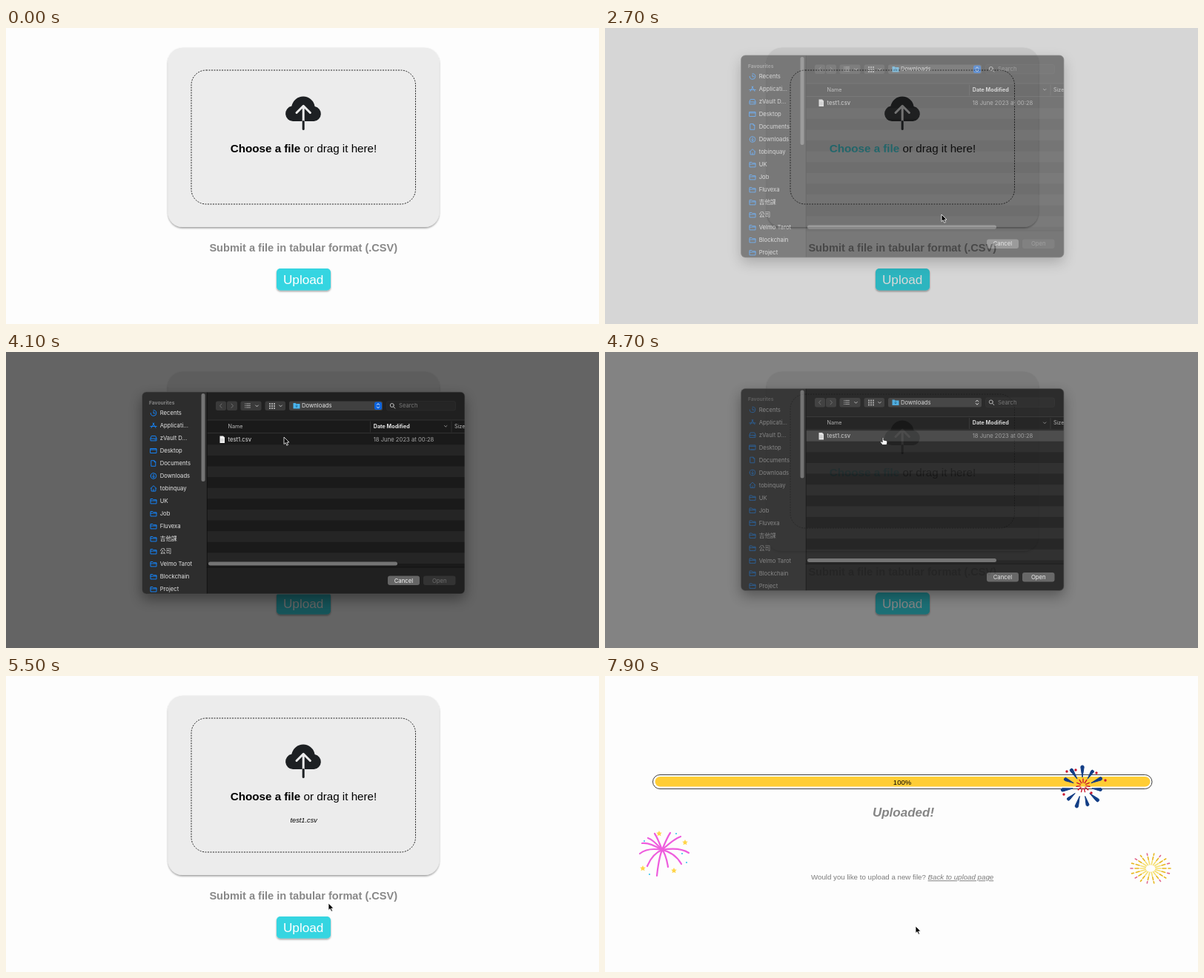
Animation of 800x400 px, one loop 8 s. Source, as an HTML page:

```html
<!DOCTYPE html>
<html lang="en">
<head>
<meta charset="utf-8">
<title>CSV upload</title>
<style>
  html, body { margin: 0; width: 100%; height: 100%; overflow: hidden; background: #fdfdfd; }
  svg { display: block; width: 800px; height: 400px; }
  text { white-space: pre; }
  .page { font-family: "Liberation Sans", Arial, sans-serif; }
  .sheet { font-family: Inter, "Noto Sans CJK TC", "Noto Sans CJK", sans-serif; font-size: 7.7px; fill: #e4e4e4; }
  .mid { text-anchor: middle; }
  .bold { font-weight: 700; }
  .line { fill: none; stroke-linecap: round; stroke-linejoin: round; }
</style>
</head>
<body>
<svg id="stage" viewBox="0 0 800 400"></svg>
<script>
const LOOP = 8000, STEP = 100;
const stage = document.getElementById('stage');
const clamp = v => Math.max(0, Math.min(1, v));
const between = (t, a, b) => t >= a && t < b;

const rect = (x, y, w, h, r, fill, more = '') =>
  `<rect x="${x}" y="${y}" width="${w}" height="${h}" rx="${r}" fill="${fill}" ${more}/>`;
const path = (d, stroke, width = 1, more = '') =>
  `<path class="line" d="${d}" stroke="${stroke}" stroke-width="${width}" ${more}/>`;
const dot = (x, y, r, fill) => `<circle cx="${x}" cy="${y}" r="${r}" fill="${fill}"/>`;
const text = (x, y, str, more = '') => `<text x="${x}" y="${y}" ${more}>${str}</text>`;
const polar = (cx, cy, r, a, squash = 1) =>
  [cx + r * Math.cos(a), cy + r * Math.sin(a) * squash].map(v => v.toFixed(1)).join(' ');

function uploadPage() {
  return `<g id="upload" class="page">
    ${rect(218.5, 26.5, 366, 242.5, 20, '#ececec', 'filter="url(#soft)"')}
    ${rect(250, 57, 302.5, 181, 20, 'none', 'stroke="#222" stroke-dasharray="2 1.5"')}
    <path fill="#1d2023" d="M387 126a10.3 10.3 0 0 1-1.6-20.4A15.8 15.8 0 0 1 416.6 106A10.1 10.1 0 0 1 415.5 126Z"/>
    ${path('M401.2 126V106M392 114.500L401.200 105.300L410.400 114.500', '#ececec', 3)}
    ${path('M401.2 126.500V136.500', '#1d2023', 3)}
    <text class="mid" x="401.500" y="168" font-size="15.2"><tspan id="choose" class="bold">Choose a file</tspan> or drag it here!</text>
    ${text(401.7, 198, 'test1.csv', 'id="chosen" class="mid" font-size="9.2" font-style="italic"')}
    ${text(401.3, 302, 'Submit a file in tabular format (.CSV)', 'class="mid bold" font-size="14.6" fill="#888"')}
    ${rect(365, 325, 73, 29.5, 5, '#34d5e1', 'id="button" filter="url(#soft)"')}
    ${text(401.2, 346, 'Upload', 'class="mid" font-size="17.2" fill="#fff"')}
  </g>`;
}

const folder = 'M-4 3V-3H-1L0-1.800H4V3ZM-4-.500H4';
const icons = [
  'M-3.800 0A3.800 3.800 0 1 0 0-3.800M0-2V.300H2',
  'M-3 3L.800-3.500M3 3L-.800-3.500M-4.200 1H4.200',
  'M-4 3V0L-2.800-3H2.800L4 0V3ZM-4 .500H4M2 1.700H2.500',
  'M-4-3H4V3H-4ZM-4-1.500H4M-2 3H2',
  'M-2.800-3.800H1L2.800-2V3.800H-2.800ZM1-3.800V-2H2.800',
  'M-3.800 0A3.800 3.800 0 1 0 3.800 0A3.800 3.800 0 1 0-3.800 0M0-2V2M-1.500 .600L0 2L1.500 .600',
  'M-4 0L0-3.800L4 0M-2.900-.500V3.500H2.900V-.500M0 3.500V1'
];
const places = ['Recents', 'Applicati...', 'zVault D...', 'Desktop', 'Documents', 'Downloads', 'tobinquay',
  'UK', 'Job', 'Fluvexa', '吉他課', '公司', 'Velmo Tarot', 'Blockchain', 'Project'];

function sidebar() {
  const items = places.map((name, i) => {
    const y = 82.5 + 17 * i;
    return `<g transform="translate(199 ${y})">${path(icons[i] || folder, '#1681f2', 1)}</g>` + text(207.7, y + 2.7, name);
  }).join('');
  return rect(184, 54.5, 87, 272, 0, '#2d2d2d') +
    `<g id="places">${text(193, 71, 'Favourites', 'class="bold" font-size="6.7" fill="#858585"')}${items}</g>` +
    rect(263.5, 56, 5, 119, 2.5, '#747474');
}

function toolbar() {
  const chevron = x => path(`M${x - 1.8} 72l1.800 1.800l1.800-1.800`, '#ccc', 0.9);
  const bullets = [70, 72.5, 75].map(y => path(`M322.500 ${y}h.500M324.500 ${y}h5`, '#bbb', 0.8)).join('');
  const tiles = [69, 72, 75].map(y => [355, 358, 361].map(x => rect(x, y, 2, 2, 0.3, '#aaa')).join('')).join('');
  return rect(283, 66.5, 14, 12.5, 2.5, '#3a3a3a') + rect(298, 66.5, 14, 12.5, 2.5, '#3a3a3a') +
    path('M291 70L288.500 72.800L291 75.500M304 70L306.500 72.800L304 75.500', '#777', 0.9) +
    rect(316.5, 66.5, 28, 12.5, 2.5, '#3a3a3a') + bullets + chevron(338.5) +
    rect(349.5, 66.5, 27.5, 12.5, 2.5, '#3a3a3a') + tiles + chevron(370.5) +
    rect(382, 66.5, 126, 12.5, 2.5, '#404040') +
    `<path d="M387.500 76.500V69h3l1 1h5v6.500Z" fill="#4bb5ee"/>` +
    path('M392 71.300v3m-1.300-1.200l1.300 1.200l1.300-1.200', '#176795', 0.8) +
    text(399, 75.4, 'Downloads') +
    rect(497, 67.5, 10, 10.5, 2.5, '#0b62dc', 'id="popup"') +
    path('M500.300 71.500l1.700-1.800l1.700 1.800M500.300 74l1.700 1.800l1.700-1.800', '#fff', 0.9) +
    rect(513.5, 66.5, 93, 12.5, 2.5, '#252525', 'stroke="#333" stroke-width=".5"') +
    path('M523.300 72a2.500 2.500 0 1 1-5 0a2.500 2.500 0 1 1 5 0M522.800 74l2 2.200', '#ccc', 0.9) +
    text(530, 75.4, 'Search', 'fill="#777"');
}

function fileList() {
  let rows = '';
  for (let i = 1; i < 12; i += 2) rows += rect(271, 110.7 + 14.6 * i, 348, 14.6, 0, '#252525');
  return rect(271, 92, 348, 199, 0, '#1a1a1a') + rows +
    rect(271, 110.7, 348, 14.6, 0, '#0a54c4', 'id="row"') +
    path('M271 92H619M271 109.500H619M491.500 94V108M601 94V108', '#3b3b3b', 0.7) +
    text(299.5, 103, 'Name', 'font-size="7.2" fill="#bbb"') +
    text(495.7, 103, 'Date Modified', 'class="bold" font-size="7.2"') +
    path('M591.500 99.500l1.700 1.700l1.700-1.700', '#aaa', 0.8) +
    text(605, 103, 'Size', 'font-size="7.2" fill="#bbb"') +
    `<path d="M288.500 113.500h4.500l2 2v7.500h-6.500Z" fill="#f1f1f1"/>` +
    path('M290 118h3.500M290 120h3.500', '#aaa', 0.6) +
    text(299.5, 120.8, 'test1.csv') +
    text(495.7, 120.8, '18 June 2023 at 00:28', 'fill="#a5a5a5"') +
    rect(273, 283.5, 255, 5, 2.5, '#747474');
}

function fileSheet() {
  return `<g id="sheet" class="sheet">
    ${rect(183.5, 54, 435.5, 273, 6, '#202020', 'filter="url(#deep)"')}
    <g clip-path="url(#sheetClip)">
      ${rect(271, 54, 348, 273, 0, '#202020')}${sidebar()}${toolbar()}${fileList()}
      ${path('M271.300 54V327M271 291H619', '#101010', 0.8)}
      ${rect(515, 302.5, 43, 12.5, 3, '#656565')}
      ${text(536.5, 311.5, 'Cancel', 'class="mid" font-weight="500"')}
      ${rect(563, 302.5, 43.5, 12.5, 3, '#333', 'id="open"')}
      ${text(584.7, 311.5, 'Open', 'id="openLabel" class="mid"')}
    </g>
    ${rect(183.5, 54, 435.5, 273, 6, 'none', 'stroke="#555" stroke-width=".7"')}
  </g>`;
}

function pinkBurst() {
  const tips = [[47, 240], [50, 226], [58, 219], [67, 213], [88, 212], [102, 217], [113, 239], [103, 254], [85, 258], [70, 270], [57, 257]];
  const rays = tips.map(([x, y]) =>
    path(`M77 235Q${(77 + x) / 2 + (x - 77) * 0.15} ${(235 + y) / 2 - 6} ${x} ${y}`, '#ee5ddd', 2.2)).join('');
  const star = ([x, y]) => {
    const points = Array.from({ length: 10 }, (_, i) => polar(x, y, i % 2 ? 2 : 4, -Math.PI / 2 + i * Math.PI / 5));
    return `<path d="M${points.join('L')}Z" fill="#ffd54a"/>`;
  };
  return rays + [[73, 213], [108, 225], [51, 260], [93, 263]].map(star).join('') +
    [[53, 223], [96, 213], [110, 252], [60, 268], [104, 240]].map(([x, y]) => dot(x, y, 1.1, '#38c6ed')).join('');
}

function blueBurst() {
  let out = '';
  for (let i = 0; i < 11; i++) {
    const a = -Math.PI / 2 + i * Math.PI * 2 / 11;
    const r = 27 - i % 2 * 2;
    out += `<path d="M${polar(644, 150, 13, a)}L${polar(644, 150, r, a - 0.08)}A2 2 0 0 1 ${polar(644, 150, r, a + 0.08)}Z" fill="#123d85" stroke="#123d85" stroke-linejoin="round"/>`;
    out += path(`M${polar(645, 148, 4, a)}L${polar(645, 148, 9, a)}`, '#c8162e', 1.4);
  }
  return out + [[623, 129], [635, 127], [675, 141], [619, 160], [656, 158], [663, 131]].map(([x, y]) => dot(x, y, 1.7, '#c8162e')).join('');
}

function goldBurst() {
  let out = '';
  for (let i = 0; i < 18; i++) {
    const a = i * Math.PI / 9;
    const ray = (r0, r1, color) => path(`M${polar(736, 260, r0, a, 0.75)}L${polar(736, 260, r1, a, 0.75)}`, color, 1.6);
    out += ray(7, 14, '#f6df70') + ray(16, 21, '#e8b71e') + ray(24, 27, i % 2 ? '#e2698c' : '#e8b71e');
  }
  return out;
}

const bursts = [[77, 240, pinkBurst], [645, 150, blueBurst], [736, 260, goldBurst]];

function resultPage() {
  return `<g id="result" class="page">
    ${rect(64.5, 133.5, 673.5, 19, 9.5, '#fff', 'stroke="#3d3d3d"')}
    ${rect(67.5, 136, 668, 13.5, 6.75, '#ffcd35', 'id="bar"')}
    ${text(401, 146.7, '', 'id="percent" class="mid" font-size="9.5"')}
    <g id="done">
      ${text(402.5, 190, 'Uploaded!', 'class="mid bold" font-size="17" font-style="italic" fill="#858585"')}
      <text x="278" y="275.300" font-size="9.73" fill="#7c7c7c">Would you like to upload a new file? <tspan font-style="italic" text-decoration="underline">Back to upload page</tspan></text>
      ${bursts.map(([, , draw]) => `<g class="burst">${draw()}</g>`).join('')}
    </g>
  </g>`;
}

stage.innerHTML = `<defs>
    <filter id="soft" x="-20%" y="-20%" width="140%" height="150%"><feDropShadow dx="0" dy="1.500" stdDeviation="1.300" flood-opacity=".4"/></filter>
    <filter id="deep" x="-20%" y="-20%" width="140%" height="150%"><feDropShadow dx="0" dy="7" stdDeviation="9" flood-opacity=".4"/></filter>
    <clipPath id="sheetClip">${rect(183.5, 54, 435.5, 273, 6, '#000')}</clipPath>
  </defs>
  ${rect(0, 0, 800, 400, 0, '#fdfdfd')}
  ${uploadPage()}${resultPage()}
  ${rect(0, 0, 800, 400, 0, '#000', 'id="dim"')}
  ${fileSheet()}
  <g id="cursor">
    <circle id="ring" r="18" fill="none" stroke="#222" stroke-width="1.800"/>
    <path id="arrow" d="M0 0V9.500L2.200 7.600L3.800 11.200L5.500 10.400L3.900 7H7Z" fill="#000" stroke="#fff" stroke-width=".800"/>
    <path id="hand" d="M-.900 .800Q0-.700 .900 .800V4L5 5Q6 5.300 5.800 7L5 10.500H-.800L-3.500 7Q-4 5.500-2.500 5.800L-.900 7Z" fill="#fff" stroke="#222" stroke-width=".800"/>
  </g>`;

const el = {};
stage.querySelectorAll('[id]').forEach(node => el[node.id] = node);
const burstNodes = stage.querySelectorAll('.burst');
const set = (name, attr, value) => el[name].setAttribute(attr, value);
const show = (name, on) => set(name, 'display', on ? 'inline' : 'none');

// time, x, y of the pointer tip
const route = [[700, 440, 361], [900, 441, 337], [1500, 387, 158], [2000, 387, 158], [2700, 454, 252],
  [3000, 460, 262], [3900, 375, 115], [4900, 375, 115], [5500, 435, 307], [6200, 419, 338], [8000, 419, 338]];

function pointer(t) {
  const i = Math.max(1, route.findIndex(key => key[0] >= t));
  const [t0, x0, y0] = route[i - 1], [t1, x1, y1] = route[i];
  const p = clamp((t - t0) / (t1 - t0)), e = p * p * (3 - 2 * p);
  return [x0 + (x1 - x0) * e, y0 + (y1 - y0) * e];
}

function render(t) {
  const [x, y] = pointer(t);
  const hand = between(t, 1500, 2100) || between(t, 4700, 5000) || between(t, 5900, 7200);
  show('cursor', t >= 700);
  set('cursor', 'transform', `translate(${x} ${y})`);
  show('hand', hand);
  show('arrow', !hand);
  show('ring', [1700, 6600, 6900].some(click => between(t, click, click + 100)));

  show('upload', t < 7200);
  set('choose', 'fill', between(t, 1500, 5000) ? '#34d5e1' : '#000');
  show('chosen', t >= 5000);
  set('button', 'fill', between(t, 5900, 7200) ? '#2fcbd7' : '#34d5e1');

  const open = t < 4600 ? clamp((t - 2600) / 400) : clamp(1 - (t - 4620) / 400);
  const active = t < 4700, picked = t >= 4300;
  set('dim', 'opacity', 0.605 * open);
  show('sheet', open > 0);
  set('sheet', 'opacity', 0.35 + 0.65 * open);
  set('sheet', 'transform', `translate(0 ${-22.7 * (1 - open)})`);
  set('places', 'opacity', active ? 1 : 0.5);
  set('popup', 'fill', active ? '#0b62dc' : '#404040');
  show('row', picked);
  set('row', 'fill', active ? '#0a54c4' : '#464646');
  set('open', 'fill', !picked ? '#333' : active ? '#0b62dc' : '#656565');
  set('openLabel', 'fill', picked ? '#fff' : '#6d6d6d');

  const progress = clamp((t - 7200) / 400);
  show('result', t >= 7200);
  set('bar', 'width', 668 * progress);
  el.percent.textContent = Math.round(100 * progress) + '%';
  show('done', progress === 1);
  const grow = 0.4 + 0.6 * clamp((t - 7600) / 300);
  burstNodes.forEach((node, i) => {
    const [cx, cy] = bursts[i];
    node.setAttribute('transform', `translate(${cx} ${cy}) scale(${grow}) translate(${-cx} ${-cy})`);
  });
}

const start = performance.now();
function tick() {
  const t = (performance.now() - start) % LOOP;
  render(Math.floor(t / STEP) * STEP);
  requestAnimationFrame(tick);
}
tick();
</script>
</body>
</html>
```
